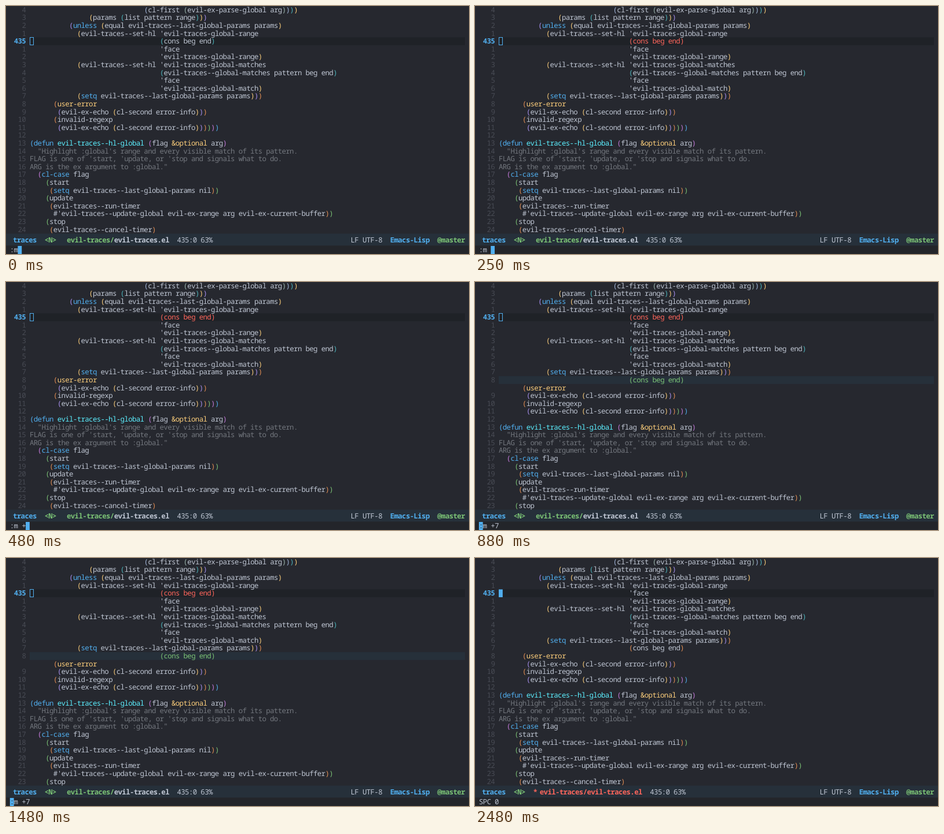
An HTML page for the animation above (2.88 s loop, 800 px wide and 430 px high).

```html
<!DOCTYPE html>
<html lang="en">
<head>
<meta charset="utf-8">
<title>Moving a line in the editor</title>
<style>
  html, body { margin: 0; width: 100%; height: 100%; overflow: hidden; background: #26282f; }
  svg { display: block; width: 800px; height: 430px; }
  text {
    font: 12.4px "Noto Sans Mono", "DejaVu Sans Mono", monospace;
    letter-spacing: -0.63px;
    white-space: pre;
    text-rendering: geometricPrecision;
  }
  .bold { font-weight: 700; }
</style>
</head>
<body>
<svg id="stage" viewBox="0 0 800 430"></svg>
<script>
const CHAR = 6.81, ROW = 13.6, LEFT = 41, ECHO_LEFT = 6.8, CURRENT = 4;
const color = {
  bg: '#26282f', line: '#1f2227', bar: '#26303a', echo: '#23252a',
  fg: '#bfc6d3', dim: '#484b54', doc: '#73777e', blue: '#51afef',
  green: '#7bc275', red: '#ff665c', yellow: '#fcce7b', cyan: '#5cefff'
};
const depthColors = [color.blue, '#c57bdb', color.green, '#e69055', '#a991f1',
  color.yellow, '#4db5bd', '#a2b6da', '#9cb6ad'];
const START_DEPTH = 7;
const wordColors = {
  unless: color.blue, setq: color.blue, defun: color.blue, 'cl-case': color.blue,
  'user-error': color.yellow, '&optional': color.yellow, 'evil-traces--hl-global': color.cyan
};

const source = String.raw`
                             (cl-first (evil-ex-parse-global arg))))
               (params (list pattern range)))
          (unless (equal evil-traces--last-global-params params)
            (evil-traces--set-hl 'evil-traces-global-range
                                 (cons beg end)
                                 'face
                                 'evil-traces-global-range)
            (evil-traces--set-hl 'evil-traces-global-matches
                                 (evil-traces--global-matches pattern beg end)
                                 'face
                                 'evil-traces-global-match)
            (setq evil-traces--last-global-params params)))
      (user-error
       (evil-ex-echo (cl-second error-info)))
      (invalid-regexp
       (evil-ex-echo (cl-second error-info))))))

(defun evil-traces--hl-global (flag &optional arg)
  "Highlight :global's range and every visible match of its pattern.
FLAG is one of 'start, 'update, or 'stop and signals what to do.
ARG is the ex argument to :global."
  (cl-case flag
    (start
     (setq evil-traces--last-global-params nil))
    (update
     (evil-traces--run-timer
      #'evil-traces--update-global evil-ex-range arg evil-ex-current-buffer))
    (stop
     (evil-traces--cancel-timer)`.split('\n').slice(1);

const steps = [
  { until: 250, echo: ':m', cursor: 2 },
  { until: 480, echo: ':m ', cursor: 3, marked: true },
  { until: 680, echo: ':m +', cursor: 4, marked: true },
  { until: 880, echo: ':m +7', cursor: 5, marked: true, preview: 6 },
  { until: 1880, echo: ':m +7', cursor: 0, marked: true, preview: 12 },
  { until: 2880, echo: 'SPC 0', moved: true }
];
const LOOP = steps.at(-1).until;

const escapeText = s => s.replace(/&/g, '&amp;').replace(/</g, '&lt;');
const span = (s, fill) => `<tspan fill="${fill}">${escapeText(s)}</tspan>`;
const rect = (x, y, w, h, fill) =>
  `<rect x="${x}" y="${y}" width="${w}" height="${h}" fill="${fill}"/>`;
const textTag = (x, y, inner, fill, bold) =>
  `<text x="${x}" y="${y}" fill="${fill}"${bold ? ' class="bold"' : ''}>${inner}</text>`;
const label = (x, y, s, fill = color.fg, bold = false) =>
  textTag(x, y, escapeText(s), fill, bold);
const baseline = row => row * ROW + 10.7;

function codeLine(line, row, paint) {
  const body = line.trimStart();
  const x = LEFT + (line.length - body.length) * CHAR;
  return textTag(x, baseline(row), paint(body), color.fg);
}

// Returns a painter that carries bracket depth from line to line.
function createPainter() {
  let depth = START_DEPTH;
  return body => body.replace(/[()]|[^()\s]+|\s+/g, token => {
    if (token === '(') return span(token, depthColors[depth++]);
    if (token === ')') return span(token, depthColors[--depth]);
    return span(token, wordColors[token] || color.fg);
  });
}

function drawBuffer({ marked, preview, moved }) {
  const lines = source.map((text, i) => ({
    text,
    tint: i >= 18 && i <= 20 ? color.doc : marked && i === CURRENT ? color.red : null
  }));
  if (moved) lines.splice(11, 0, ...lines.splice(CURRENT, 1));
  if (preview) lines.splice(preview, 0, { text: source[CURRENT], tint: color.green, ghost: true });

  const paint = createPainter();
  const stripe = (row, fill) => rect(LEFT, row * ROW, 793 - LEFT, ROW, fill);
  let out = stripe(CURRENT, color.line);
  lines.slice(0, source.length).forEach(({ text, tint, ghost }, row) => {
    if (ghost) out += stripe(row, color.bar);
    out += codeLine(text, row, tint ? s => span(s, tint) : paint);

    // The number belongs to the preview row, so the pushed-down line has none.
    if (preview && row === preview + 1) return;
    const current = row === CURRENT;
    const shift = preview && row > preview ? 1 : 0;
    const number = String(current ? 435 : Math.abs(row - CURRENT) - shift);
    out += label(LEFT - (number.length + 1) * CHAR, baseline(row), number,
      current ? color.blue : color.dim, current);
  });

  return out + (moved
    ? rect(LEFT, CURRENT * ROW, CHAR, ROW, color.blue)
    : `<rect x="41.5" y="54.5" width="6" height="13" fill="none" stroke="${color.blue}"/>`);
}

function drawModeline(moved) {
  const y = 409.5, shift = moved ? CHAR : 0, path = 'evil-traces/';
  const pathX = 105 + shift;
  return rect(0, 394.6, 800, 21, color.bar)
    + label(12, y, 'traces', color.blue, true)
    + label(66.5, y, '<N>', color.green, true)
    + (moved ? label(100.5, y, '*', color.red, true) : '')
    + label(pathX, y, path, moved ? color.red : color.green, true)
    + label(pathX + path.length * CHAR, y, 'evil-traces.el', moved ? color.red : color.fg, true)
    + label(295.5 + shift, y, '435:0 63%')
    + label(595.5, y, 'LF UTF-8')
    + label(663.7, y, 'Emacs-Lisp', color.blue, true)
    + label(745.3, y, '@master', color.green, true);
}

function drawEcho({ echo, cursor }) {
  let out = rect(0, 415.6, 800, 14.4, color.echo);
  if (cursor !== undefined) out += rect(ECHO_LEFT + cursor * CHAR, 416, CHAR, 14, color.blue);
  const inner = span(echo[0], cursor === 0 ? color.bg : color.fg) + span(echo.slice(1), color.fg);
  return out + textTag(ECHO_LEFT, 426.9, inner, color.fg);
}

const scenes = steps.map(step =>
  rect(0, 0, 800, 430, color.bg) + drawBuffer(step) + drawModeline(step.moved) + drawEcho(step));
const stage = document.getElementById('stage');
const start = performance.now();
let shown = -1;

function tick() {
  const time = (performance.now() - start) % LOOP;
  const index = steps.findIndex(step => time < step.until);
  if (index !== shown) stage.innerHTML = scenes[shown = index];
  requestAnimationFrame(tick);
}
tick();
</script>
</body>
</html>
```
